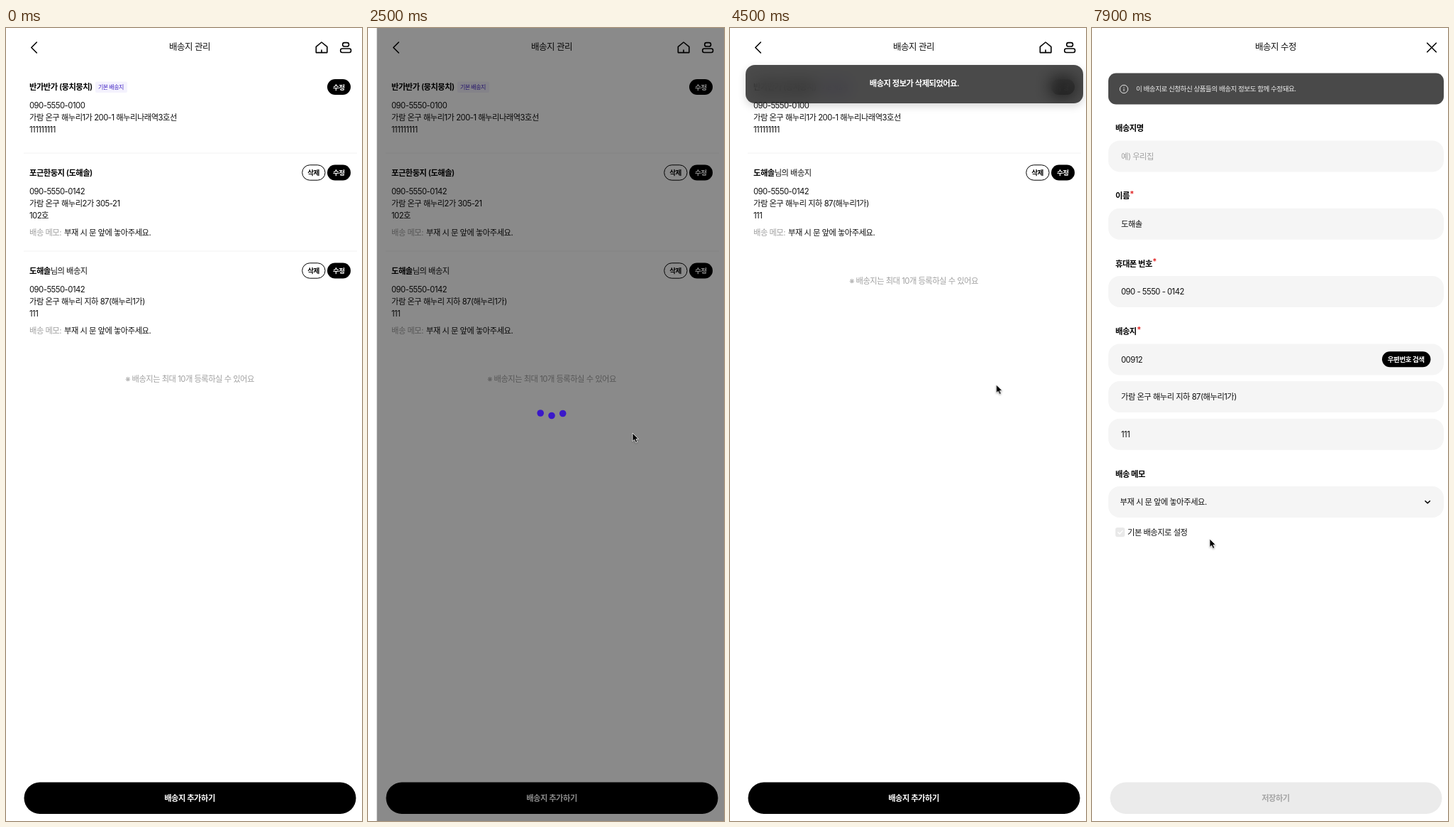
An HTML page that plays this animation: 502 px wide and 1116 px high, repeating every 8000 ms.

```html
<!DOCTYPE html>
<html lang="ko">
<head>
<meta charset="utf-8">
<title>배송지 관리</title>
<style>
html, body { margin: 0; width: 100%; height: 100%; overflow: hidden; background: #fff; }
#stage { position: relative; width: 502px; height: 1116px; overflow: hidden;
  font: 400 11.3px Inter, "Noto Sans CJK KR", "Noto Sans CJK", sans-serif; letter-spacing: -.045em; }
svg { position: absolute; left: 0; top: 0; }
text { fill: #111; }
.title { font-size: 12.5px; font-weight: 500; }
.b { font-weight: 600; fill: #000; }
.mid { text-anchor: middle; }
.pill { font-size: 9.6px; font-weight: 600; }
.white { fill: #fff; }
.gray { fill: #a0a0a0; }
.red { fill: #e02020; }
.line { fill: none; stroke: #000; stroke-width: 1.6; stroke-linecap: round; stroke-linejoin: round; }
.field { fill: #f5f5f5; }

/* The screen advances in 200 ms ticks, so every track is stepped. */
.track { animation: 8s step-end -20ms infinite; }
#list { animation-name: list; }
#form { animation-name: form; }
#removed { animation-name: removed; }
#rest { animation-name: rest; }
#dim { animation-name: dim; }
#modal { animation-name: modal; }
#loader { animation-name: loader; }
#loader circle { animation-name: bob; }
#toast { animation-name: toast; position: absolute; left: 21.5px; top: 52px; width: 476px; height: 54px;
  border-radius: 13px; background: rgba(0, 0, 0, .71); backdrop-filter: blur(12px);
  box-shadow: 0 4px 12px rgba(0, 0, 0, .16); color: #fff; font-weight: 600; line-height: 53px; text-align: center; }
#cursor { animation-name: cursor; filter: drop-shadow(0 1px 1px rgba(0, 0, 0, .3)); }

@keyframes list { 0% { visibility: visible } 91.25%, 100% { visibility: hidden } }
@keyframes form { 0% { visibility: hidden } 91.25%, 100% { visibility: visible } }
@keyframes removed { 0% { opacity: 1 } 36.25%, 100% { opacity: 0 } }
@keyframes rest { 0% { transform: none } 36.25%, 100% { transform: translateY(-138px) } }
@keyframes dim { 0% { opacity: 0 } 21.25% { opacity: .155 } 23.75% { opacity: .5 } 31.25%, 100% { opacity: 0 } }
@keyframes modal { 0% { opacity: 0 } 21.25% { opacity: .2 } 23.75% { opacity: 1 } 31.25%, 100% { opacity: 0 } }
@keyframes loader {
  0% { opacity: 0 } 31.25% { opacity: 1 } 36.25% { opacity: 0 }
  41.25% { opacity: 1 } 43.75%, 100% { opacity: 0 }
}
@keyframes bob {
  0% { transform: translateY(var(--d)) } 33.75% { transform: translateY(calc(-1 * var(--d))) }
  41.25%, 100% { transform: none }
}
@keyframes toast {
  0% { opacity: 0; transform: scale(.985) } 36.25% { opacity: .81; transform: scale(.985) }
  38.75% { opacity: 1; transform: none } 58.75% { opacity: .75; transform: scale(.985) }
  61.25%, 100% { opacity: 0; transform: scale(.985) }
}
@keyframes cursor {
  0% { opacity: 0; transform: translate(462px, 520px) }
  1.25% { opacity: 1; transform: translate(460px, 470px) }
  3.75% { transform: translate(456px, 390px) }
  6.25% { transform: translate(449px, 310px) }
  8.75% { transform: translate(440px, 250px) }
  11.25% { transform: translate(433px, 215px) }
  13.75% { transform: translate(431px, 205px) }
  16.25% { transform: translate(430px, 206px) }
  18.75% { transform: translate(392px, 300px) }
  21.25% { transform: translate(325px, 443px) }
  23.75% { transform: translate(342px, 540px) }
  26.25% { transform: translate(366px, 584px) }
  28.75% { transform: translate(368px, 586px) }
  31.25% { transform: translate(373px, 570px) }
  33.75% { transform: translate(378px, 532px) }
  36.25% { transform: translate(381px, 504px) }
  46.25% { transform: translate(378px, 503px) }
  48.75% { transform: translate(375.5px, 502px) }
  58.75% { transform: translate(384px, 480px) }
  61.25% { transform: translate(404px, 430px) }
  63.75% { transform: translate(424px, 382px) }
  66.25% { transform: translate(432px, 364px) }
  78.75% { transform: translate(432px, 300px) }
  81.25% { transform: translate(435.5px, 233px) }
  83.75% { transform: translate(460px, 206px) }
  86.25% { transform: translate(468px, 200px) }
  93.75% { transform: translate(395px, 350px) }
  96.25% { transform: translate(235px, 610px) }
  98.75%, 100% { opacity: 1; transform: translate(166px, 719px) }
}
</style>
</head>
<body>
<div id="stage">
<svg width="502" height="1116">
  <defs>
    <g id="edit">
      <rect x="453" y="-11" width="33" height="22" rx="11"/>
      <text class="pill white mid" x="469.3" y="3.5">수정</text>
    </g>
    <g id="both">
      <rect x="417.7" y="-10.7" width="32.3" height="21.4" rx="10.7" fill="#fff" stroke="#000"/>
      <text class="pill b mid" x="433.5" y="3.5">삭제</text>
      <use href="#edit"/>
    </g>
    <g id="memo">
      <text class="gray" x="33" y="0">배송 메모:</text>
      <text x="82" y="0">부재 시 문 앞에 놓아주세요.</text>
    </g>
    <path id="rule" d="M25 0H495" stroke="#f2f2f2"/>
    <rect id="box" class="field" x="23" width="473" height="44" rx="16"/>
    <rect id="action" x="25.5" y="1061.5" width="468" height="44.5" rx="22.2"/>
    <tspan id="star"/>
  </defs>

  <g id="list" class="track">
    <path class="line" d="M43.3 20L35.8 27.5L43.3 35"/>
    <text class="title mid" x="259" y="31.2">배송지 관리</text>
    <path class="line" d="M437.3 26.3L445 20L452.8 26.3V34.6H437.3ZM445 31V34.6"/>
    <rect class="line" x="474.7" y="20.6" width="8.8" height="5.4" rx="2.6"/>
    <rect class="line" x="471.7" y="29" width="14.8" height="5.5" rx="2.4"/>

    <text class="b" x="33" y="87">반가반가 (뭉치뭉치)</text>
    <rect x="126" y="75.5" width="45" height="15.5" rx="2" fill="#f4f2fd"/>
    <text x="130" y="86.2" style="font-size:8px;font-weight:500;fill:#4427c4">기본 배송지</text>
    <use href="#edit" y="83"/>
    <text x="33" y="113.3">090-5550-0100</text>
    <text x="33" y="130.3">가람 온구 해누리1가 200-1 해누리나래역3호선</text>
    <text x="33" y="147.3">111111111</text>

    <g id="removed" class="track">
      <use href="#rule" y="176"/>
      <text class="b" x="33" y="207.5">포근한둥지 (도해솔)</text>
      <use href="#both" y="203.5"/>
      <text x="33" y="234">090-5550-0142</text>
      <text x="33" y="251">가람 온구 해누리2가 305-21</text>
      <text x="33" y="268">102호</text>
      <use href="#memo" y="292"/>
    </g>

    <g id="rest" class="track">
      <use href="#rule" y="314"/>
      <text x="33" y="345.5"><tspan class="b">도해솔</tspan>님의 배송지</text>
      <use href="#both" y="341.5"/>
      <text x="33" y="372">090-5550-0142</text>
      <text x="33" y="389">가람 온구 해누리 지하 87(해누리1가)</text>
      <text x="33" y="406">111</text>
      <use href="#memo" y="430"/>
      <text class="gray mid" x="259" y="498">※ 배송지는 최대 10개 등록하실 수 있어요</text>
    </g>

    <use href="#action"/>
    <text class="b white mid" x="259" y="1088">배송지 추가하기</text>
  </g>

  <g id="form" class="track">
    <text class="title mid" x="259" y="31.2">배송지 수정</text>
    <path class="line" d="M472.7 21.2L485.3 33.8M485.3 21.2L472.7 33.8"/>
    <rect x="23" y="63.5" width="473" height="44" rx="11" fill="#494949"/>
    <g fill="none" stroke="#e4e4e4">
      <circle cx="45" cy="86" r="5.7"/>
      <path d="M45 85.2V89M45 82.8V84"/>
    </g>
    <text x="62" y="88.8" style="font-size:9.6px;fill:#ececec">이 배송지로 신청하신 상품들의 배송지 정보도 함께 수정돼요.</text>

    <text class="b" x="33" y="145.3">배송지명</text>
    <use href="#box" y="158.5"/>
    <text class="gray" x="41" y="185">예) 우리집</text>
    <text class="b" x="33" y="240.3">이름<tspan class="red" dx=".5" dy="-2.5">*</tspan></text>
    <use href="#box" y="253.7"/>
    <text x="41" y="280">도해솔</text>
    <text class="b" x="33" y="335.5">휴대폰 번호<tspan class="red" dx=".5" dy="-2.5">*</tspan></text>
    <use href="#box" y="349"/>
    <text x="41" y="375.3">090 - 5550 - 0142</text>
    <text class="b" x="33" y="431">배송지<tspan class="red" dx=".5" dy="-2.5">*</tspan></text>
    <use href="#box" y="444.5"/>
    <text x="41" y="470.6">00912</text>
    <rect x="409" y="455.3" width="68.5" height="22" rx="11"/>
    <text class="pill white mid" x="442.7" y="469.7">우편번호 검색</text>
    <use href="#box" y="497"/>
    <text x="41" y="523.3">가람 온구 해누리 지하 87(해누리1가)</text>
    <use href="#box" y="549.7"/>
    <text x="41" y="576">111</text>
    <text class="b" x="33" y="632">배송 메모</text>
    <use href="#box" y="645"/>
    <text x="39.5" y="671.3">부재 시 문 앞에 놓아주세요.</text>
    <path class="line" d="M470 665.7L473.2 668.8L476.4 665.7"/>
    <rect x="33" y="703" width="13.3" height="13.3" rx="3" fill="#e9e9e9"/>
    <path class="line" d="M36.7 709.7L39 712L43 707.6" style="stroke:#fff;stroke-width:1.4"/>
    <text x="50" y="713.8">기본 배송지로 설정</text>
    <use href="#action" fill="#ebebeb"/>
    <text class="b mid" x="259" y="1088" style="fill:#a5a5a5">저장하기</text>
  </g>

  <rect id="dim" class="track" x="12.5" width="490" height="1116"/>
  <g id="modal" class="track">
    <rect x="32" y="499.5" width="455" height="124" rx="27" fill="#fff"/>
    <text class="mid" x="259.3" y="537.4">저장한 배송지 정보를 삭제할까요?</text>
    <text class="b mid" x="151" y="590.3">취소</text>
    <rect x="264" y="566" width="206.5" height="40.5" rx="20"/>
    <text class="b white mid" x="367" y="590.3">삭제</text>
  </g>

  <g id="loader" class="track">
    <rect x="12.5" width="490" height="1116" opacity=".46"/>
    <g fill="#3a18c9">
      <circle class="track" style="--d:-2px" cx="243.2" cy="544" r="4.8"/>
      <circle class="track" style="--d:2px" cx="259" cy="543.5" r="4.8"/>
      <circle class="track" style="--d:-3px" cx="274.7" cy="545.5" r="4.8"/>
    </g>
  </g>
</svg>

<div id="toast" class="track">배송지 정보가 삭제되었어요.</div>

<svg width="502" height="1116">
  <g id="cursor" class="track">
    <path d="M0 0V11.6L2.7 9.2L4.6 13.5L6.8 12.5L4.9 8.4H8.4Z" stroke="#fff" stroke-width=".8"/>
  </g>
</svg>
</div>
</body>
</html>
```
